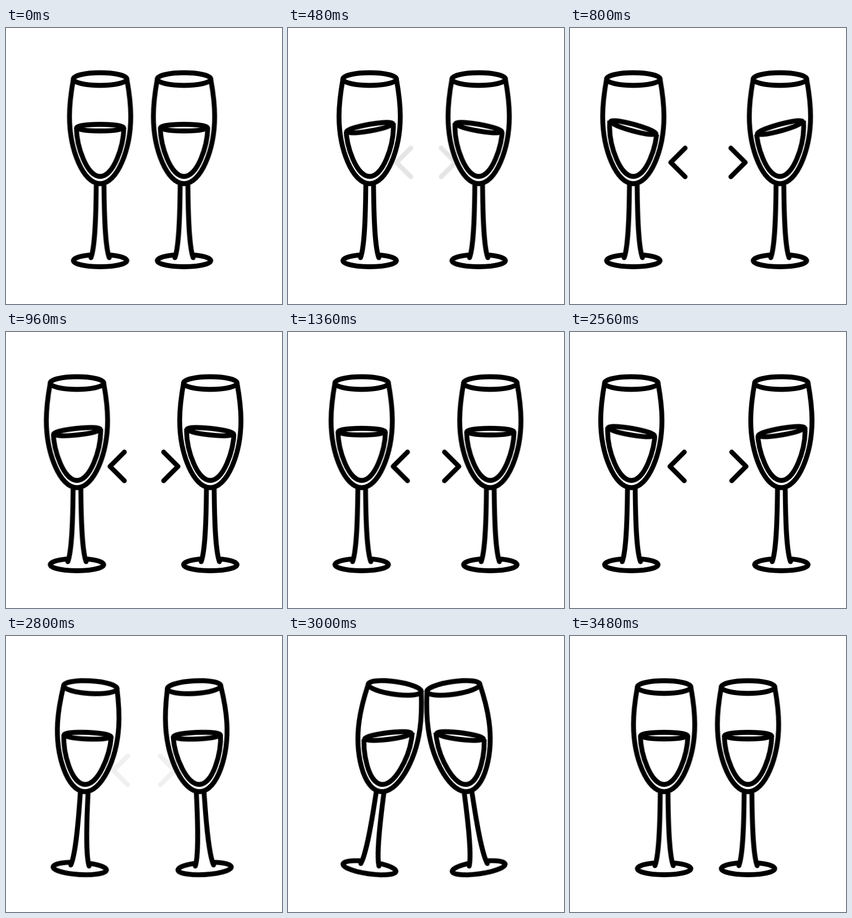
These frames come from a looping animation (500 px wide and 500 px high, 3760 ms). An HTML page without scripts:

```html
<!DOCTYPE html>
<html lang="en">
<head>
<meta charset="utf-8">
<title>Clinking glasses</title>
<style>
  html, body { margin: 0; width: 100%; height: 100%; overflow: hidden; background: #fff; }
  svg { display: block; width: 100%; height: 100%; }
  .ink { fill: none; stroke: #000; stroke-width: 8.8; stroke-linecap: round; stroke-linejoin: round; }

  .slide, .tilt, .slosh, .drift {
    animation: 3760ms cubic-bezier(.37, 0, .63, 1) infinite;
  }
  .slide { animation-name: slide; }
  .tilt { animation-name: tilt; transform-origin: 0 257px; }
  .slosh { animation-name: slosh; transform-origin: 0 180.5px; }
  .drift { animation-name: drift, show; }

  .left { --far: -59.5px; --away: -37px; }
  .right { --far: -60.5px; --away: -44px; }

  @keyframes slide {
    0%, 8.511%, 79.787%, 100% { transform: translateX(0); }
    18.617%, 68.617% { transform: translateX(var(--far)); }
    28.723%, 56.383% { transform: translateX(var(--away)); }
  }
  @keyframes tilt {
    0%, 70.213%, 87.234%, 100% { transform: rotate(0deg); }
    79.787% { transform: rotate(8deg); }
  }
  @keyframes slosh {
    0%, 8.511%, 36.17%, 56.383%, 92.553%, 100% { transform: rotate(0deg); }
    12.766% { transform: rotate(-10deg); }
    20.745% { transform: rotate(16deg); }
    25.532% { transform: rotate(-6deg); }
    30.851% { transform: rotate(3deg); }
    61.17% { transform: rotate(-5deg); }
    69.681% { transform: rotate(11deg); }
    79.787% { transform: rotate(-15deg); }
    84.043% { transform: rotate(8deg); }
    88.298% { transform: rotate(-3deg); }
  }
  @keyframes drift {
    0%, 8.511%, 79.787%, 100% { transform: translateX(206px); }
    18.617%, 68.617% { transform: translateX(181px); }
    28.723%, 56.383% { transform: translateX(190.5px); }
  }
  @keyframes show {
    0%, 12.234%, 75%, 100% { opacity: 0; }
    14.894%, 71.809% { opacity: 1; }
  }
</style>
</head>
<body>
<svg viewBox="0 0 500 500">
  <defs>
    <clipPath id="below-surface">
      <rect class="slosh" x="-70" y="180.5" width="140" height="120"/>
    </clipPath>
    <g id="glass">
      <ellipse cy="92.5" rx="48.5" ry="11.5"/>
      <path d="M-48.5 93C-53 118-55.5 137-55.5 160C-55.5 220-31 282 0 282S55.5 220 55.5 160C55.5 137 53 118 48.5 93"/>
      <path d="M-7 284C-7.5 340-9 395-16.5 416M7 284C7.5 340 9 395 16.5 416"/>
      <path d="M-16 411.1A48.5 11 0 1 0 16 411.1"/>
    </g>
    <path id="drink" d="M-42.5 160L-43 180C-42.5 215-24 269 0 269S42.5 215 43 180L42.5 160"/>
    <ellipse id="surface" cy="180.5" rx="42.5" ry="6"/>
    <path id="chevron" d="M26 217.5L0 243.5L26 269.5"/>
  </defs>

  <g class="ink">
    <g class="drift"><use href="#chevron"/></g>
    <g transform="translate(500) scale(-1 1)">
      <g class="drift"><use href="#chevron"/></g>
    </g>
    <g class="left" transform="translate(170.5)">
      <g class="slide"><g class="tilt">
        <use href="#glass"/>
        <g clip-path="url(#below-surface)"><use href="#drink"/></g>
        <g class="slosh"><use href="#surface"/></g>
      </g></g>
    </g>
    <g class="right" transform="translate(322.5) scale(-1 1)">
      <g class="slide"><g class="tilt">
        <use href="#glass"/>
        <g clip-path="url(#below-surface)"><use href="#drink"/></g>
        <g class="slosh"><use href="#surface"/></g>
      </g></g>
    </g>
  </g>
</svg>
</body>
</html>
```
